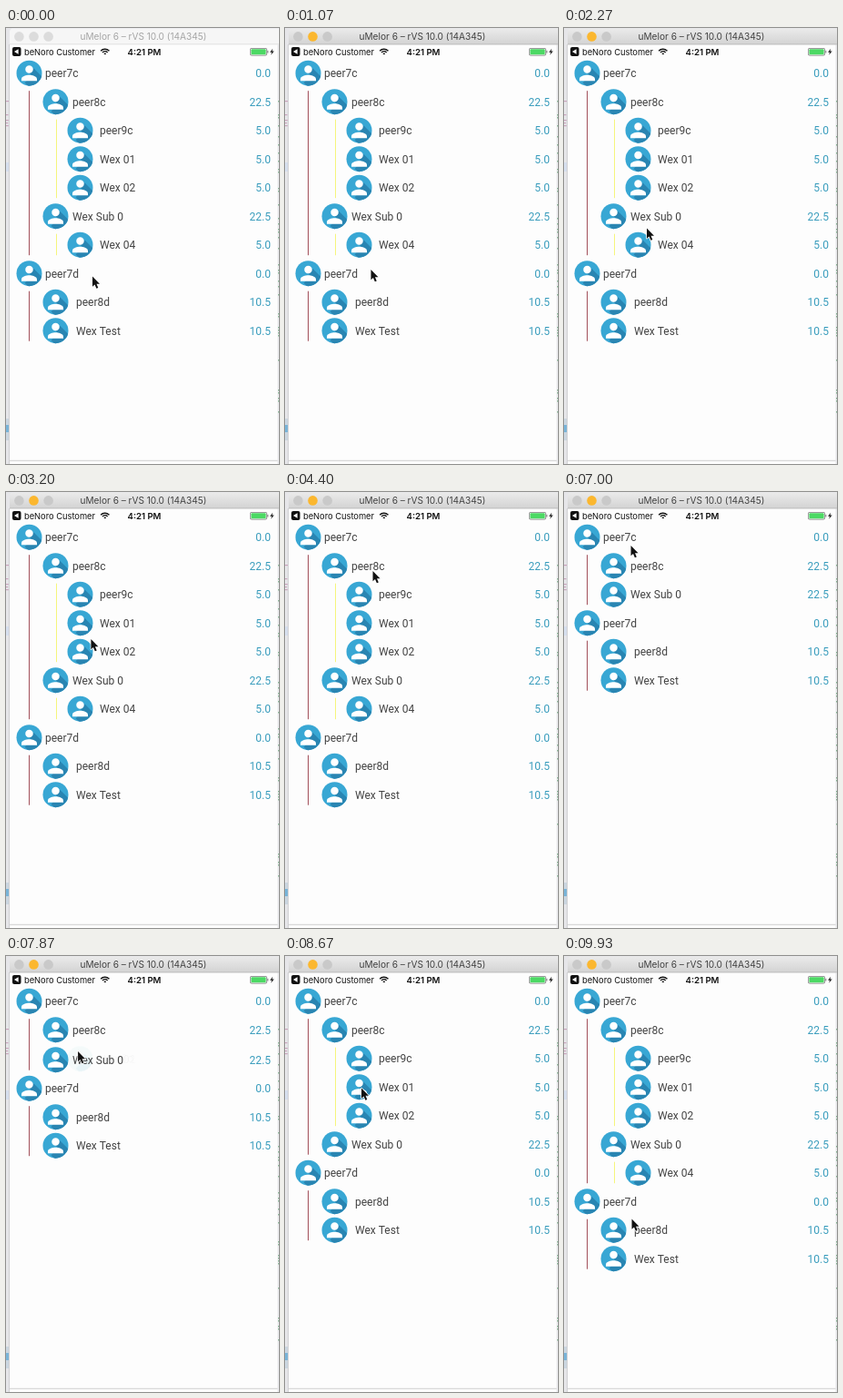
An HTML page with a canvas for the animation above (9990 ms loop, 300x480 px).

```html
<!DOCTYPE html>
<html lang="en">
<head>
<meta charset="utf-8">
<title>Tree list demo</title>
<style>
  html, body { margin: 0; width: 100%; height: 100%; overflow: hidden; background: #fff; }
  canvas { display: block; width: 300px; height: 480px; }
</style>
</head>
<body>
<canvas id="stage"></canvas>
<script>
const W = 300, H = 480, LOOP = 9990;
const ROW = 31.5, FIRST_ROW = 49.7, FADE = 280, ACTIVATE_AT = 500;
const AVATAR_R = 14;
const LINE_COLORS = ['#a3505a', '#f5f57c'];
const UI_FONT = 'Inter, sans-serif', LIST_FONT = '12px Roboto, sans-serif';

const PERSON = new Path2D('M-8 8v-2c0-2.7 5.3-4 8-4s8 1.3 8 4v2zM4-4a4 4 0 1 1-8 0a4 4 0 1 1 8 0z');
const ARROW = new Path2D('M0 0v11.2l2.5-2.3 1.9 4.3 1.9-.8-1.8-4.2h3.5z');
const BOLT = new Path2D('M293 22.8l-3 4h2l-.8 3 3.4-4.2h-2.1z');

const canvas = document.getElementById('stage');
const ctx = canvas.getContext('2d');
const ratio = window.devicePixelRatio || 1;
canvas.width = W * ratio;
canvas.height = H * ratio;

const node = (label, value, children = [], closed = null) => ({ label, value, children, closed });

// "closed" holds the moments at which a branch folds and unfolds.
const tree = [
  node('peer7c', '0.0', [
    node('peer8c', '22.5', [
      node('peer9c', '5.0'), node('Wex 01', '5.0'), node('Wex 02', '5.0')
    ], [5000, 7850]),
    node('Wex Sub 0', '22.5', [node('Wex 04', '5.0')], [6300, 9150])
  ]),
  node('peer7d', '0.0', [node('peer8d', '10.5'), node('Wex Test', '10.5')])
];

// Places where the pointer turns or rests
const pointerStops = [
  { t: 0, x: 95, y: 273.5 },
  { t: 700, x: 95, y: 273.5 },
  { t: 2270, x: 91, y: 220.5 },
  { t: 4300, x: 96.5, y: 87 },
  { t: 5730, x: 96.5, y: 87 },
  { t: 6300, x: 85, y: 117 },
  { t: 7000, x: 73.5, y: 59 },
  { t: 8670, x: 84, y: 145.5 },
  { t: 9930, x: 74.5, y: 289.5 }
];

const clamp = v => Math.max(0, Math.min(1, v));
const ease = v => v * v * (3 - 2 * v);
const mix = (a, b, k) => a + (b - a) * k;
const step = (t, start) => ease(clamp((t - start) / FADE));

function seeded(seed) {
  return () => (seed = seed * 16807 % 2147483647) / 2147483647;
}

function openness({ closed }, t) {
  return closed ? 1 - step(t, closed[0]) + step(t, closed[1]) : 1;
}

function pointerAt(t) {
  const i = pointerStops.findIndex(stop => stop.t > t);
  if (i < 0) return pointerStops.at(-1);
  const a = pointerStops[i - 1], b = pointerStops[i];
  const k = ease((t - a.t) / (b.t - a.t));
  return { x: mix(a.x, b.x, k), y: mix(a.y, b.y, k) };
}

function rect(x, y, w, h, fill) {
  ctx.fillStyle = fill;
  ctx.fillRect(x, y, w, h);
}

function disc(x, y, r, fill) {
  ctx.fillStyle = fill;
  ctx.beginPath();
  ctx.arc(x, y, r, 0, Math.PI * 2);
  ctx.fill();
}

function rounded(x, y, w, h, r, fill) {
  ctx.fillStyle = fill;
  ctx.beginPath();
  ctx.roundRect(x, y, w, h, r);
  ctx.fill();
}

function triangle(x, y, dx, dy, fill) {
  ctx.fillStyle = fill;
  ctx.beginPath();
  ctx.moveTo(x, y);
  ctx.lineTo(x + dx, y - dy);
  ctx.lineTo(x + dx, y + dy);
  ctx.fill();
}

function text(str, x, y, font, fill, align = 'left') {
  ctx.font = font;
  ctx.fillStyle = fill;
  ctx.textAlign = align;
  ctx.fillText(str, x, y);
}

function verticalFade(top, bottom, from, to) {
  const fill = ctx.createLinearGradient(0, top, 0, bottom);
  fill.addColorStop(0, from);
  fill.addColorStop(1, to);
  return fill;
}

function drawDesktop() {
  rect(0, 0, W, H, '#e6e6e9');
  rect(0, 148, 4, 10, '#d6dfee');
  rect(0, 430, 4, 24, '#cbd6e0');
  rect(0, 437, 4, 8, '#79b4d8');
  rect(3, 18, 1, H, '#cfcfd2');

  // Edges of code showing beside the window
  const random = seeded(41);
  for (let y = 80; y < 430; y += 3) {
    if (random() < 0.3) rect(299, y, 1, 1.5, '#7fae8c');
    if (y < 110 && random() < 0.5) rect(0, y, 2 + random(), 1.2, '#c9a3bb');
  }
}

function drawTitleBar(active) {
  const fill = active ? verticalFade(1, 18, '#eaeaea', '#d3d3d3') : '#f6f6f6';
  rounded(4, 0.5, W, 18, [4, 0, 0, 0], fill);
  rect(4, 17.5, W, 0.7, active ? '#b9b9b9' : '#dcdcdc');
  const idle = active ? '#c9c9c9' : '#dcdcdc';
  for (let i = 0; i < 3; i++)
    disc(14.4 + i * 16.1, 9.4, 5.3, active && i === 1 ? '#fbb72f' : idle);
  text('uMelor 6 – rVS 10.0 (14A345)', 151, 13.3, `10.1px ${UI_FONT}`,
    active ? '#424242' : '#a5a5a5', 'center');
}

function drawStatusBar() {
  rounded(7, 21, 9.5, 10, 2, '#111');
  triangle(9, 26, 4.6, 2.8, '#fff');
  text('beNoro Customer', 20, 29.5, `9.3px ${UI_FONT}`, '#111');
  text('4:21 PM', 152, 29.6, `600 9.6px ${UI_FONT}`, '#111', 'center');

  ctx.strokeStyle = '#111';
  ctx.lineWidth = 1.4;
  for (let r = 1.2; r < 7; r += 2.6) {
    ctx.beginPath();
    ctx.arc(108.8, 29.6, r, -Math.PI * 0.76, -Math.PI * 0.24);
    ctx.stroke();
  }

  rounded(268, 22, 19, 8.4, 2, '#777');
  rounded(268.7, 22.7, 17.6, 7, 1.4, '#fdfdfd');
  rounded(269.4, 23.2, 16.2, 6, 1, '#4cd964');
  rect(287.3, 24.8, 1, 2.8, '#777');
  ctx.fillStyle = '#222';
  ctx.fill(BOLT);
}

function drawAvatar(x, y) {
  ctx.save();
  ctx.translate(x, y);
  disc(0, 0, AVATAR_R, '#38a7d4');
  ctx.clip();

  // Long shadow cast at 45 degrees
  ctx.save();
  ctx.rotate(Math.PI / 4);
  rect(0, -7.2, AVATAR_R, 7.2, '#2985b2');
  rect(4, 0, AVATAR_R, 11, '#2985b2');
  ctx.restore();

  ctx.scale(1.06, 1.06);
  ctx.fillStyle = '#fff';
  ctx.fill(PERSON);
  ctx.restore();
}

// Draws a branch centred on y and returns the centre of the row after it.
function drawBranch(item, depth, y, scale, t, shift = 0) {
  const center = 25.5 + depth * 29 - (depth > 1 ? 2 : 0);
  ctx.globalAlpha = scale;
  drawAvatar(center, y);
  text(item.label, 43 + depth * 30 + shift, y + 4.3, LIST_FONT, '#434343');
  text(item.value, 291, y + 4.3, LIST_FONT, '#3a9dbd', 'right');

  const childScale = scale * openness(item, t);
  let next = y + ROW * scale;
  if (!item.children.length || childScale < 0.01) return next;

  const childShift = item === tree[1] ? 4 : 0;
  for (const child of item.children)
    next = drawBranch(child, depth + 1, next, childScale, t, childShift);
  ctx.globalAlpha = childScale;
  rect(25 + depth * 30, y + 19.5, 1, Math.max(0, next - y - 39.5), LINE_COLORS[depth]);
  return next;
}

function drawPointer({ x, y }) {
  ctx.save();
  ctx.translate(x, y);
  ctx.lineJoin = 'round';
  ctx.lineWidth = 1.4;
  ctx.strokeStyle = '#fff';
  ctx.stroke(ARROW);
  ctx.fillStyle = '#111';
  ctx.fill(ARROW);
  ctx.restore();
}

function render(t) {
  ctx.setTransform(ratio, 0, 0, ratio, 0, 0);
  ctx.globalAlpha = 1;
  drawDesktop();
  rect(4, 18, 294.5, H, '#fdfdfd');
  rect(4, 475.8, 294.5, 0.9, '#c9c9c9');
  drawTitleBar(t >= ACTIVATE_AT);
  drawStatusBar();
  let y = FIRST_ROW;
  for (const item of tree) y = drawBranch(item, 0, y, 1, t);
  ctx.globalAlpha = 1;
  drawPointer(pointerAt(t));
}

const start = performance.now();
function tick() {
  render((performance.now() - start) % LOOP);
  requestAnimationFrame(tick);
}
tick();
</script>
</body>
</html>
```
